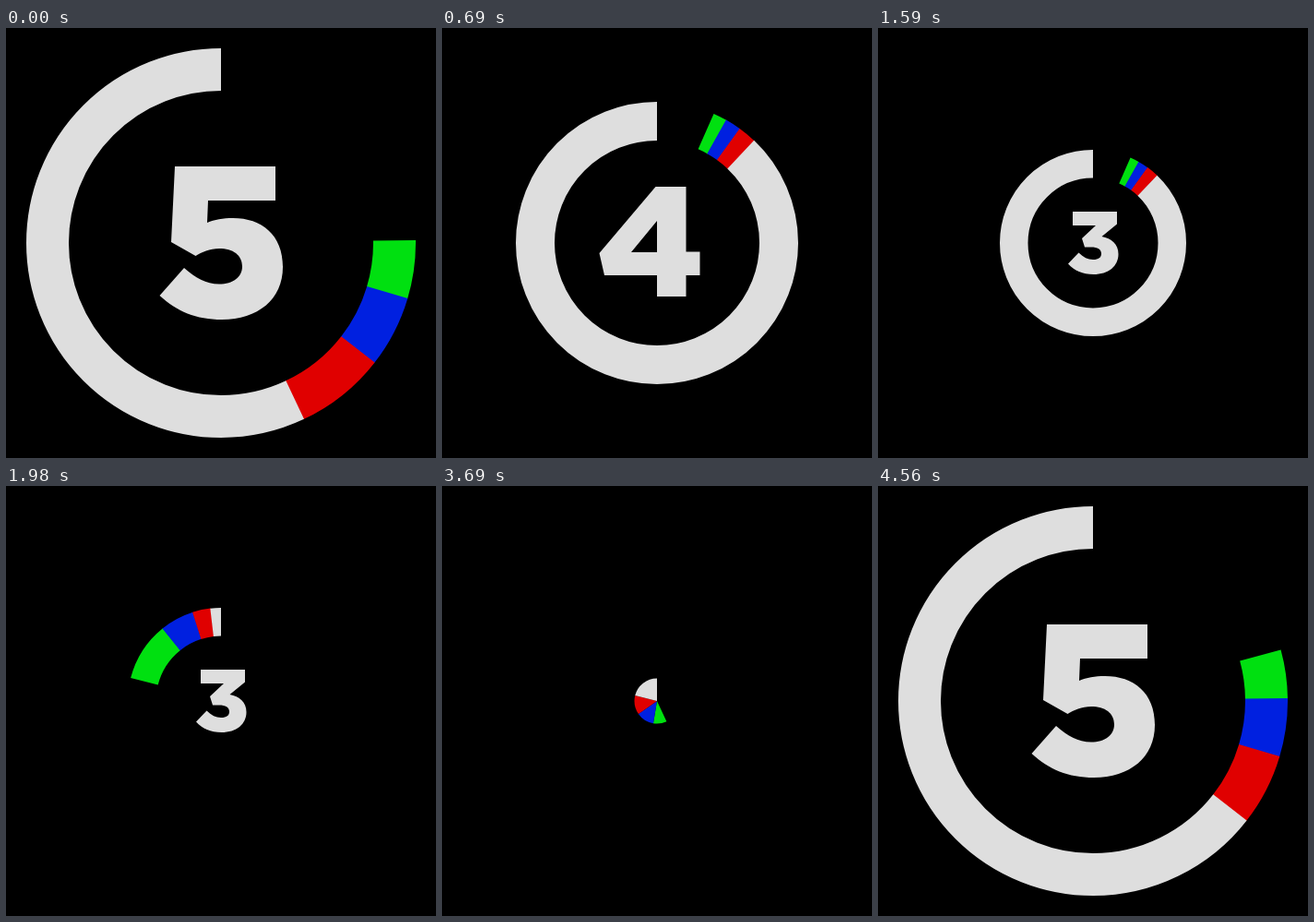
An HTML page for the animation above (4.59 s loop, 466 px wide and 466 px high).

```html
<!DOCTYPE html>
<html lang="en">
<head>
<meta charset="utf-8">
<title>Countdown</title>
<style>
html, body { margin: 0; width: 100%; height: 100%; overflow: hidden; background: #000; }
svg { display: block; width: 100%; height: 100%; }
</style>
</head>
<body>
<svg id="stage" viewBox="0 0 466 466" role="img" aria-label="Countdown from 5"></svg>
<script>
const TICK = 30, LOOP = 153, START = 21;   // ms per step, steps per loop, steps elapsed at load
const STEP = 30, SWEEP = 29, LIFE = 33;    // spacing, sweep length and life of a ring, in steps
const WHITE = '#dedede';
const COLORS = [WHITE, '#e00000', '#0020e0', '#00e010'];

const RINGS = [
  { outer: 211, inner: 165, digit: 'M183 150H292V187H219L218 211C226 207.500 235 206 246 206C277 206 300 224 300 259C300 294 273 316 234 316C206 316 185 307 166.500 290L193 260C205 270.500 217 277.500 231 277.500C246 277.500 256 270 256 258.500C256 246 246 239 231 239C221 239 212 243 205.500 247L179 232Z' },
  { outer: 153, inner: 111, digit: 'M231.500 172H264.500V242.500H279.500V268H264.500V291H233V268H176L170.500 244ZM233 209L205 243H233Z' },
  { outer: 101, inner: 70.5, digit: 'M211 199H259V212.500L242.500 226C253 228 260.500 234 260.500 245C260.500 258 250 267 233.500 267C221.500 267 213 263 206 255.500L217.500 243.500C222.500 248.500 227.500 251 233 251C239 251 242 248.700 242 244.500C242 240 238 237.500 231 237.500H224L221 228L236 214H211Z' },
  { outer: 59.5, inner: 35, digit: 'M221.500 224.500C224 220 228 217.700 233.500 217.700C240 217.700 244 221 244 226.500C244 231 241.500 233 238 235.700L232.500 240.300H244.700V248.300H221V239.800L232 230.700C234.500 228.600 235.300 227.600 235.300 226.300C235.300 224.900 234.200 224.200 232.700 224.200C231 224.200 229.300 225.300 227.500 228.300Z' },
  { outer: 24.5, inner: 0, digit: '' }
];

const stage = document.getElementById('stage');

function add(parent, name, attrs) {
  const el = document.createElementNS('http://www.w3.org/2000/svg', name);
  for (const key in attrs) el.setAttribute(key, attrs[key]);
  return parent.appendChild(el);
}

const views = RINGS.map(({ outer, inner, digit }) => {
  const group = add(stage, 'g', {});
  // Trailing colours first, so that white lies on top.
  const arcs = COLORS.map((_, i) => COLORS.length - 1 - i).map(lag => ({
    lag,
    el: add(group, 'circle', {
      cx: 233, cy: 233, r: (outer + inner) / 2, pathLength: 360, fill: 'none',
      stroke: COLORS[lag], 'stroke-width': outer - inner, transform: 'rotate(-90 233 233)'
    })
  }));
  const label = add(group, 'path', { d: digit, fill: WHITE, 'fill-rule': 'evenodd' });
  return { group, arcs, label };
});

// Cubic bezier (1, 0, 2/3, 1)
function ease(x) {
  if (x <= 0) return 0;
  if (x >= 1) return 1;
  let lo = 0, hi = 1;
  for (let i = 0; i < 30; i++) {
    const s = (lo + hi) / 2;
    if (s * (3 - 4 * s + 2 * s * s) < x) lo = s; else hi = s;
  }
  return lo * lo * (3 - 2 * lo);
}

const edge = (step, lag) => 360 * ease((step - lag) / SWEEP);

function show(el, on) {
  el.setAttribute('visibility', on ? 'inherit' : 'hidden');
}

function draw(ms) {
  const now = (Math.floor(ms / TICK) + START) % LOOP;
  views.forEach(({ group, arcs, label }, i) => {
    const step = now - i * STEP;
    const alive = step >= 0 && step < LIFE;
    group.setAttribute('visibility', alive ? 'visible' : 'hidden');
    if (!alive) return;
    show(label, step < STEP);
    for (const { lag, el } of arcs) {
      const from = edge(step, lag);
      const to = lag ? Math.min(360, edge(step, lag - 1) + 0.3) : 360;
      const on = to - from > 0.001;
      show(el, on);
      if (on) {
        el.setAttribute('stroke-dasharray', `${to - from} 720`);
        el.setAttribute('stroke-dashoffset', -from);
      }
    }
  });
}

const began = performance.now();
function loop() {
  draw(performance.now() - began);
  requestAnimationFrame(loop);
}
loop();
</script>
</body>
</html>
```
